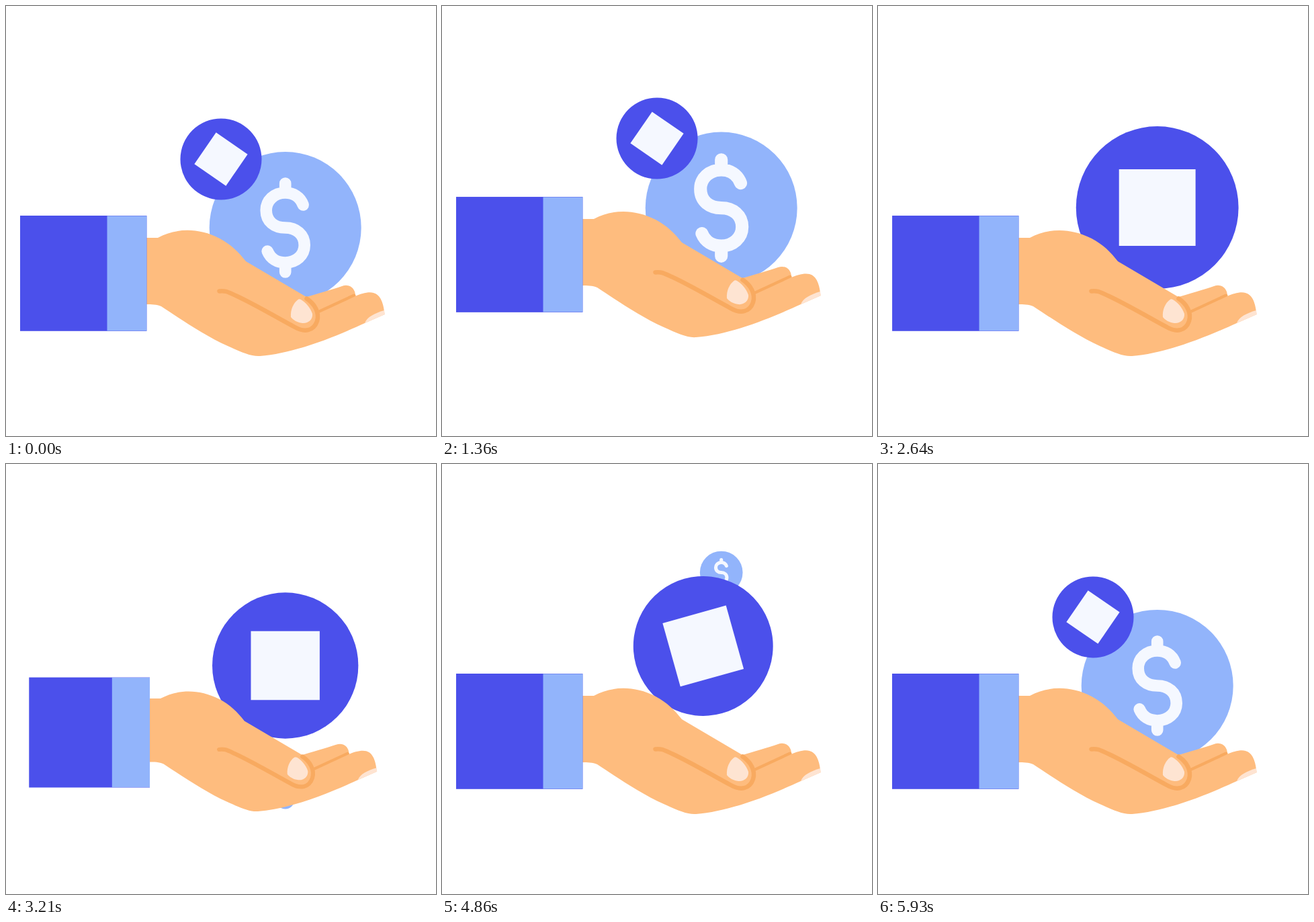
An HTML page for the animation above (6 s loop, 640 px wide and 640 px high).

```html
<!DOCTYPE html>
<html lang="en">
<head>
<meta charset="utf-8">
<title>Coins in hand</title>
<style>
  html, body { margin: 0; width: 100%; height: 100%; overflow: hidden; background: #fff; }
  svg { display: block; width: 100vw; height: 100vh; }
  .blue { fill: #4b50eb; }
  .light { fill: #92b4fb; }
  .pale { fill: #f5f8ff; }
  .skin { fill: #febc7e; }
  .nail { fill: #fee4d2; }
  .crease { fill: none; stroke: #f8aa60; stroke-linecap: round; stroke-linejoin: round; }
  .sign { fill: none; stroke: #f5f8ff; stroke-width: 17.6; stroke-linecap: round; stroke-linejoin: round; }
</style>
</head>
<body>
<svg viewBox="0 0 640 640">
  <g id="dollar">
    <circle class="light" r="113"/>
    <path id="sign" class="sign" d="M26.5-34C22-46 12-52 0-52C-17-52-28.5-40-28.5-26C-28.5-9-16 0 0 0C16 0 28.5 10 28.5 26C28.5 41 16 52 0 52C-12 52-22 46-26.5 35M0-66V-52M0 52V66"/>
  </g>
  <g id="token">
    <circle class="blue" r="121"/>
    <rect class="pale" x="-57" y="-57" width="114" height="114"/>
  </g>
  <g id="hand">
    <path class="skin" d="M440 435C465 428 485 422 500 417C511 413 520 420 520 431L530 445L450 480Z"/>
    <path class="crease" stroke-width="5" d="M464 456L518 431"/>
    <path class="skin" d="M208 345H226C252 331 285 329 318 346C335 355 346 366 357 380L447 433C458 440 464 446 466 457L520 432C528 428 540 425 547 427C558 430 562 443 563.5 459L534 472C490 492 430 517 378 521C365 522 350 515 330 506C295 490 260 466 231 447C224 444 217 444 208 444Z"/>
    <path class="nail" d="M534 472C537 463 549 457 563 453L564 459Z"/>
    <path class="crease" stroke-width="6.5" d="M317.5 424.5C326 423 331 426 342 431C372 445 402 463 430 478C444 486 458 484 463 469C467 456 459 443 447.5 435.5"/>
    <path class="nail" d="M439 437C446 441 453 449 456 458C457 467 449 473 441 472C433 471 427 467 424 463C423 452 428 442 434 437.5C436 436 437 436 439 437Z"/>
    <rect class="blue" x="21" y="312" width="188.4" height="171.8"/>
    <rect class="light" x="150.5" y="312.4" width="58.9" height="171"/>
  </g>
</svg>
<script>
const LOOP = 6000;
const RETURN = 4400; // the dollar comes back from above

const mix = (a, b, p) => a + (b - a) * p;

// Symmetric cubic-bezier(a, 0, 1 - a, 1)
function ease(x, a) {
  let lo = 0, hi = 1;
  for (let i = 0; i < 22; i++) {
    const s = (lo + hi) / 2, r = 1 - s;
    const at = 3 * a * s * r * r + 3 * (1 - a) * s * s * r + s ** 3;
    if (at < x) lo = s; else hi = s;
  }
  return lo * lo * (3 - 2 * lo);
}

// Eased progress from 0 to 1 between two times
function go(t, from, to, sharpness = 0.5) {
  return ease(Math.min(1, Math.max(0, (t - from) / (to - from))), sharpness);
}

// 0, up to 1, down to -1, back to 0
function swing(t, from, step) {
  return go(t, from, from + step)
    - 2 * go(t, from + step, from + 2 * step)
    + go(t, from + 2 * step, from + 3 * step);
}

function place(id, transform) {
  document.getElementById(id).setAttribute("transform", transform);
}

function draw(t) {
  const bob = swing(t, 0, 667);
  const pulse = -swing(t, 2600, 630);

  // The coins stay raised while they trade places and settle at the end
  const lift = go(t, 0, 667) - 2 * go(t, 667, 1333) + go(t, 5200, 5960);
  const back = go(t, RETURN, 5600);
  const swap = go(t, 1333, 2667, 0.71) - back;
  const turn = go(t, 1333, 2600, 0.71) - back;

  const returning = t >= RETURN;
  const dollarY = mix(330 + 29.5 * lift, returning ? 107 : 500, swap);
  const dollarSize = mix(1, returning ? 0 : 0.12, swap);
  place("dollar", `translate(415.7 ${dollarY}) scale(${dollarSize})`);
  place("sign", `scale(${1 - 0.088 * lift * (1 - swap)})`);

  const tokenX = mix(320, 415.7, swap);
  const tokenY = mix(228 + 31 * lift, 300, swap);
  const tokenSize = mix(0.5, 1, swap) * (1 + 0.102 * pulse);
  place("token", `translate(${tokenX} ${tokenY}) rotate(${-55.5 * (1 - turn)}) scale(${tokenSize})`);

  const handY = 434 + 30 * bob + 2 * bob * bob;
  place("hand", `translate(310 ${handY}) scale(${1 + 0.046 * pulse}) translate(-310 -434)`);
}

const start = performance.now();
function tick() {
  draw((performance.now() - start) % LOOP);
  requestAnimationFrame(tick);
}
tick();
</script>
</body>
</html>
```
